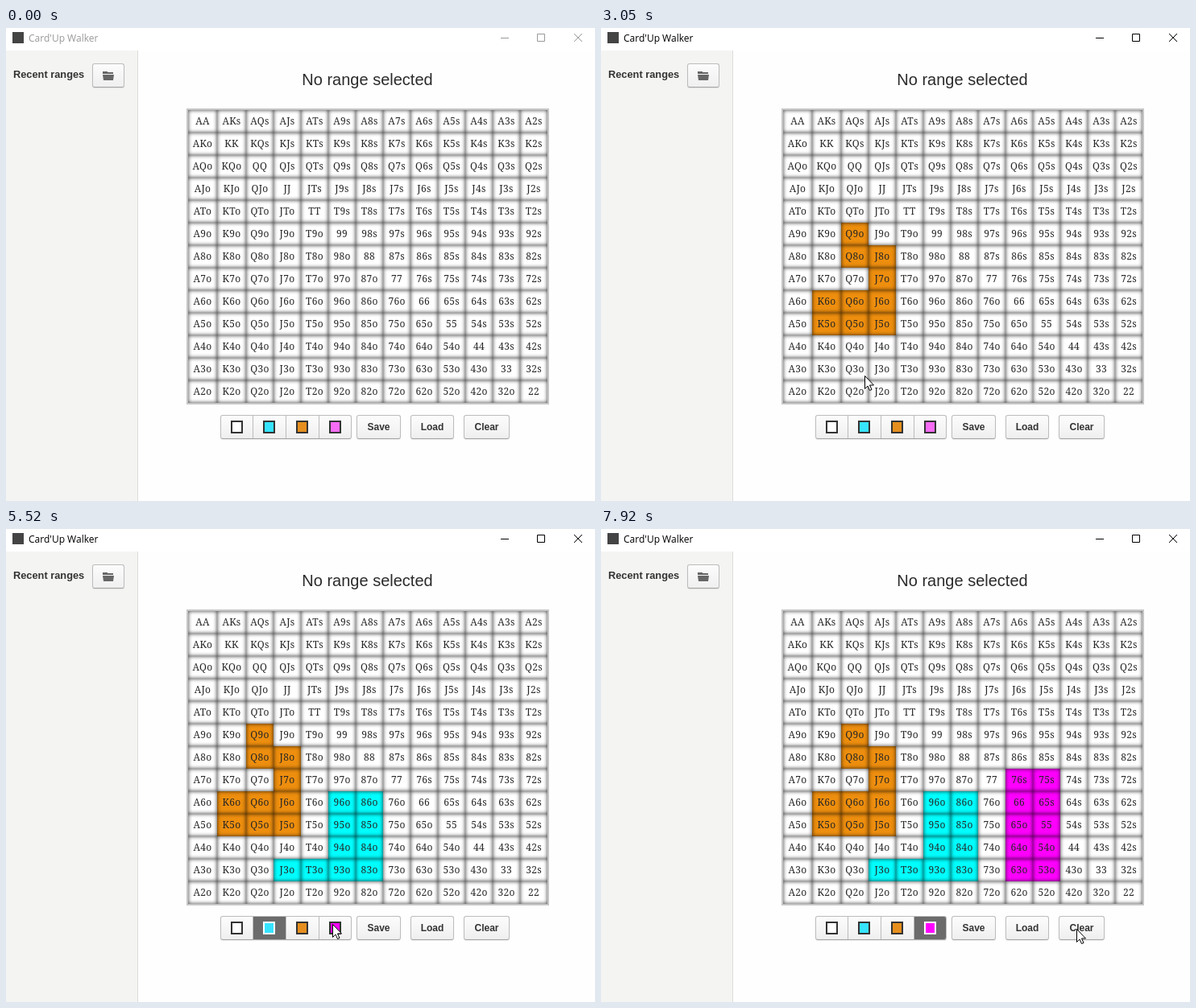
An HTML page that plays this animation: 731 by 588 pixels, repeating every 8 s.

```html
<!DOCTYPE html>
<html lang="en">
<head>
<meta charset="utf-8">
<title>Range editor</title>
<style>
  html, body { margin: 0; width: 100%; height: 100%; overflow: hidden; background: #fff; }
  #stage { position: relative; width: 731px; height: 588px; overflow: hidden; background: #fefefe;
    font-family: "Liberation Sans", Arial, sans-serif; color: #333; }
  #stage * { position: absolute; box-sizing: border-box; white-space: nowrap; }
  #bar { left: 0; top: 0; width: 731px; height: 28px; background: #fff; color: #999; }
  #bar.active { color: #000; }
  #bar svg { left: 0; top: 0; stroke: currentColor; fill: none; }
  #logo { left: 8px; top: 5px; width: 14px; height: 14px; background: #444; }
  #name { left: 28px; top: 4px; font: 12px/18px "Open Sans", sans-serif; }
  #side { left: 0; top: 28px; width: 164px; height: 560px; background: #f4f4f2; border-right: 1px solid #dcdcdc; }
  #recent { left: 9px; top: 48px; font: bold 12.8px/20px "Liberation Sans", Arial, sans-serif; }
  #heading { left: 224px; top: 52px; width: 449px; text-align: center; font-size: 20px; line-height: 24px; color: #2b2b2b; }
  #grid { left: 224px; top: 100px; width: 450px; height: 368px; border: 2px solid #c6c6c6; }
  .cell { height: 28px; text-align: center; font: 12px/28px "Noto Serif", serif; letter-spacing: .3px;
    color: #262626; background: #fff; box-shadow: inset 0 0 5px rgba(0, 0, 0, .8); }
  .cell.pressed { color: #fff; }
  .button { top: 481px; height: 30px; border: 1px solid #bcbcbc; border-bottom-color: #a4a4a4; border-radius: 3px;
    background: linear-gradient(#fcfcfc, #efefef); text-align: center;
    font: bold 12px/28px "Liberation Sans", Arial, sans-serif; box-shadow: 0 1px 1px rgba(0, 0, 0, .08); }
  #group { overflow: hidden; }
  .tab { top: 0; width: 41px; height: 28px; border-left: 1px solid #bcbcbc; }
  .tab.on { background: #6b6b6b; }
  .swatch { left: 12px; top: 6px; width: 15px; height: 16px; border: 2px solid #333; }
  .on .swatch { border-color: #fff; }
  #cursor { left: 0; top: 0; overflow: visible; }
</style>
</head>
<body>
<div id="stage">
  <div id="bar">
    <div id="logo"></div>
    <div id="name">Card'Up Walker</div>
    <svg width="731" height="28"><path d="M614 12.5H624M659.5 7.5H668.5V16.5H659.5ZM705 7L715 17M715 7L705 17"/></svg>
  </div>
  <div id="side"></div>
  <div id="recent">Recent ranges</div>
  <div class="button" style="left:107px;top:44px;width:40px">
    <svg width="38" height="28" style="left:0;top:0"><path fill="#666" d="M12 11V9H18V10H25V12H12ZM12 13H26L25 20H13Z"/></svg>
  </div>
  <div id="heading">No range selected</div>
  <div id="grid"></div>
  <div id="group" class="button" style="left:266px;width:163px"></div>
  <div class="button" style="left:435px;width:55px">Save</div>
  <div class="button" style="left:502px;width:54px">Load</div>
  <div class="button" style="left:568px;width:57px">Clear</div>
  <svg id="cursor" width="13" height="20"><path fill="#fff" stroke="#000" d="M.5 .5V16.5L4 13L6.500 18.5L9 17.5L6.500 12H11.5Z"/></svg>
</div>
<script>
const LOOP = 8000;
const RANKS = "AKQJT98765432";
const ORANGE = "#ee8e0e", CYAN = "#00ffff", PINK = "#ff00ff", PALE_PINK = "#f86cf6";
const $ = id => document.getElementById(id);

function add(parent, className, style) {
  const el = document.createElement("div");
  el.className = className;
  Object.assign(el.style, style);
  parent.appendChild(el);
  return el;
}

// Named places the cursor visits; every cell adds its own
const spots = {
  edge: [561, 574], label: [39, 62], folder: [111, 81], corner: [274, 128],
  below: [327, 432], seam: [362, 421], pinkSeam: [533, 425],
  cyan: [323, 497], nearPink: [394, 480], pink: [405, 491], rest: [514, 497], clear: [590, 497]
};

const cells = {};
for (let row = 0; row < 13; row++) {
  for (let col = 0; col < 13; col++) {
    const high = RANKS[Math.min(row, col)], low = RANKS[Math.max(row, col)];
    const label = high + low + (row === col ? "" : row < col ? "s" : "o");
    const width = col < 2 ? 36 : 34;
    const x = col * 34 + 2 * Math.min(col, 2), y = row * 28;
    const el = add($("grid"), "cell", { left: x + "px", top: y + "px", width: width + "px" });
    el.textContent = label;
    cells[label] = { el, row, paint: Infinity, fill: "#fff" };
    spots[label] = [x + width / 2 + 222, y + 108];
  }
}

const tabs = ["#fff", "#36e4ff", "#e68f1e", PALE_PINK].map((fill, i) => {
  const tab = add($("group"), "tab", { left: i * 41 - 2 + "px" });
  tab.swatch = add(tab, "swatch", { background: fill });
  if (i === 0) tab.swatch.style.left = "13px";
  return tab;
});

// Each move walks evenly through its stops; a drag also paints the cells it reaches
const moves = [];
let last = "edge";

function move(from, to, path) {
  const stops = path.split(" ");
  moves.push({ from, to, stops: [last, ...stops].map(name => spots[name]) });
  last = stops[stops.length - 1];
  return stops;
}

const drags = [];

function drag(from, to, release, fill, path) {
  const stops = move(from, to, path);
  drags.push({ from, release, row: cells[stops[0]].row });
  stops.forEach((name, i) => {
    const cell = cells[name];
    const paint = from + (to - from) * (i + 1) / stops.length;
    if (cell && paint < cell.paint) Object.assign(cell, { paint, fill });
  });
}

move(70, 870, "label folder");
move(930, 1390, "corner");
move(1620, 1850, "K9o");
drag(2170, 2800, 2890, ORANGE, "Q9o Q8o J8o J7o J6o Q6o K6o K5o Q5o J5o");
move(2890, 3050, "below");
move(3120, 3520, "cyan");
move(3670, 3820, "84o");
drag(3820, 4770, 4770, CYAN, "84o 85o 86o 96o 86o 85o 84o 83o 93o T3o J3o seam T3o 93o 94o 95o");
move(4770, 5280, "94o nearPink");
cells["94o"].paint = 4850;
cells["94o"].fill = CYAN;
drags[1].release = 4930;
move(5370, 5520, "pink");
move(5750, 5980, "64o");
drag(5980, 6840, 6920, PINK, "64o 65o 66 76s 75s 65s 55 54o 53o 63o pinkSeam");
move(6920, 7390, "rest");
move(7460, 7920, "clear");

function cursorAt(t) {
  const { from, to, stops } = moves.filter(m => m.from <= t).pop() || moves[0];
  const end = stops.length - 1;
  const pos = Math.min(1, Math.max(0, (t - from) / (to - from))) * end;
  const i = Math.min(Math.floor(pos), end - 1);
  return stops[i].map((v, axis) => Math.round(v + (stops[i + 1][axis] - v) * (pos - i)));
}

function draw(t) {
  $("bar").classList.toggle("active", t >= 2170);

  const held = drags.find(d => t >= d.from && t < d.release);
  for (const { el, row, paint, fill } of Object.values(cells)) {
    el.style.backgroundColor = t >= paint ? fill : "#fff";
    el.classList.toggle("pressed", !!held && held.row === row);
  }

  const chosen = t >= 5750 ? 3 : t >= 3670 ? 1 : -1;
  tabs.forEach((tab, i) => tab.classList.toggle("on", i === chosen));
  tabs[3].swatch.style.background = t >= 5440 ? PINK : PALE_PINK;

  const [x, y] = cursorAt(t);
  $("cursor").style.transform = `translate(${x}px, ${y}px)`;
  $("cursor").style.visibility = t < 70 ? "hidden" : "visible";
}

function tick() {
  draw(performance.now() % LOOP);
  requestAnimationFrame(tick);
}
tick();
</script>
</body>
</html>
```
